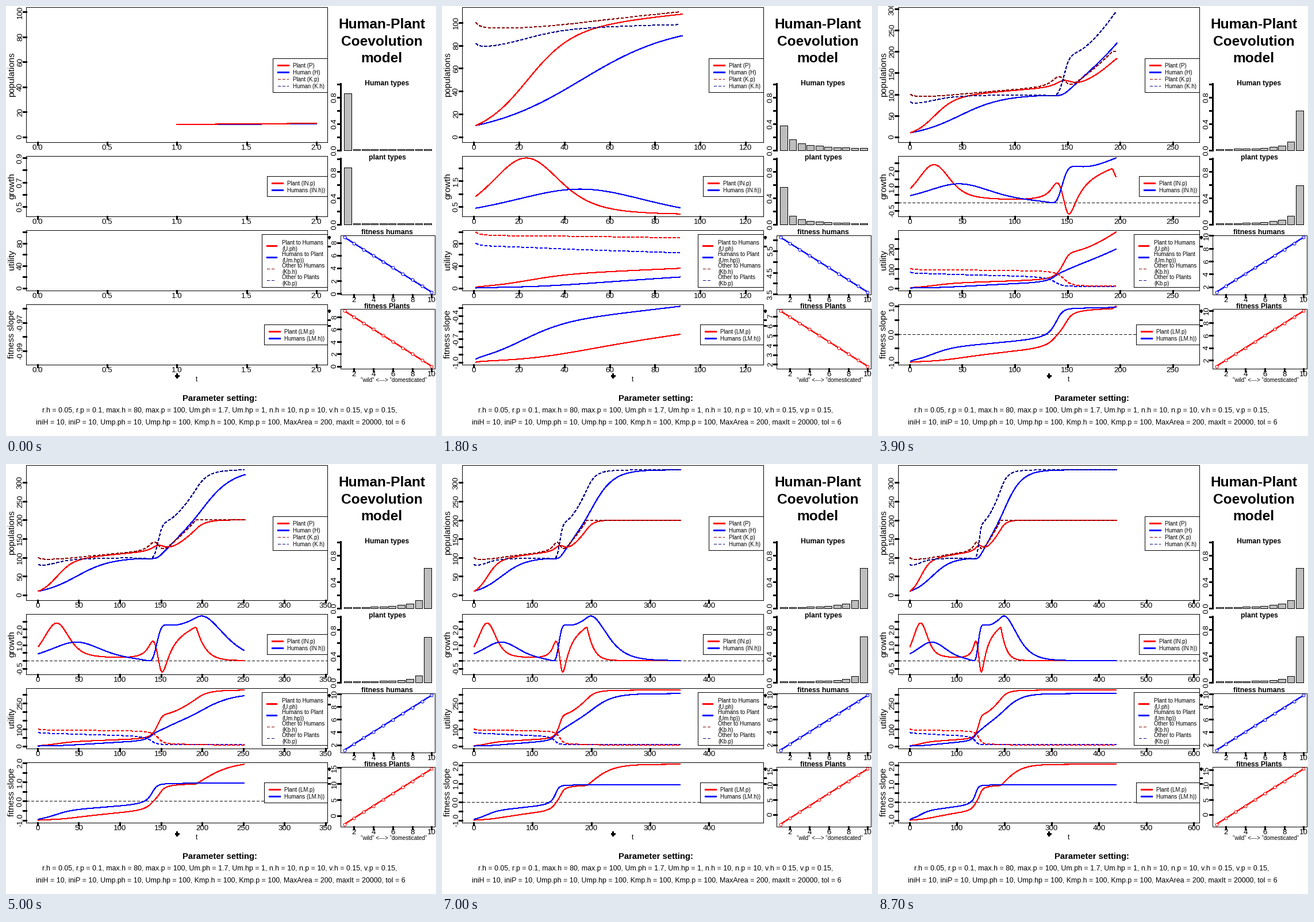
These frames come from a looping animation (748 by 748 pixels, 8800 ms). A matplotlib script:

```python
import math
import numpy as np
import matplotlib.pyplot as plt
from matplotlib.animation import FuncAnimation
from matplotlib.lines import Line2D
from matplotlib.patches import Rectangle

SIZE, DPI = 748, 100
FRAMES, STEP = 88, 5
PT = 72 / DPI
DASH = (0, (4.6, 3.2))
DARK_RED, DARK_BLUE = "#8b0000", "#00008b"
AXIS_FONT, GAP = 13.33, 8.45

plt.rcParams["font.family"] = "Liberation Sans"
fig = plt.figure(figsize=(SIZE / DPI, SIZE / DPI), dpi=DPI, facecolor="white")
ax = fig.add_axes([0, 0, 1, 1])
ax.set_xlim(0, SIZE)
ax.set_ylim(SIZE, 0)
ax.axis("off")


# ---- model -------------------------------------------------------------

def mutate(share, v=0.15):
    return (1 - v) * share + v / len(share)


def fitness(slope):
    return 5 + slope * (np.arange(1, 11) - 5)


def simulate(steps):
    keys = "P H Kp Kh INp INh Uph Uhp Kbh Kbp LMp LMh types_h types_p".split()
    log = {k: [] for k in keys}
    human = np.eye(10)[0]
    plant = np.eye(10)[0]
    H = P = 10.0
    for _ in range(steps):
        u_ph = P * (plant @ np.linspace(0.17, 1.7, 10))
        u_hp = H * (human @ np.linspace(0.01, 1, 10))
        kb_h = human @ np.linspace(80, 0.8, 10)
        kb_p = plant @ np.linspace(100, 1, 10)
        room = min(kb_p, 200 - u_hp)          # limited by the available area
        k_h, k_p = u_ph + kb_h, u_hp + room
        lm_h, lm_p = (u_ph - kb_h) / k_h, (u_hp - room) / k_p
        in_h = 0.05 * H * (1 - H / k_h)
        in_p = 0.1 * P * (1 - P / k_p)
        mixed_h, mixed_p = mutate(human), mutate(plant)
        row = (P, H, k_p, k_h, in_p, in_h, u_ph, u_hp, kb_h, kb_p,
               lm_p, lm_h, mixed_h, mixed_p)
        for k, value in zip(keys, row):
            log[k].append(value)
        human = mixed_h * np.maximum(fitness(lm_h), 0)
        plant = mixed_p * np.maximum(fitness(lm_p), 0)
        human, plant = human / human.sum(), plant / plant.sum()
        H, P = H + in_h, P + in_p
    return {k: np.array(v) for k, v in log.items()}


DATA = simulate(STEP * FRAMES + 5)


# ---- drawing helpers ---------------------------------------------------

def line(xs, ys, color="black", dash=None, z=2):
    art = Line2D(xs, ys, color=color, lw=0.75, ls=dash or "-",
                 antialiased=False, zorder=z)
    return ax.add_line(art)


def rect(x0, y0, x1, y1, fill="none", z=3):
    art = Rectangle((x0 + .5, y0 + .5), x1 - x0, y1 - y0, fc=fill, ec="black",
                    lw=0.72, antialiased=False, zorder=z)
    return ax.add_patch(art)


def text(x, y, s, px, ha="center", rot=0, bold=False):
    return ax.text(x, y, s, fontsize=px * PT, ha=ha, va="baseline",
                   rotation=rot, rotation_mode="anchor", zorder=6,
                   fontweight="bold" if bold else "normal")


def padded(lo, hi):
    pad = 0.04 * (hi - lo)
    return lo - pad, hi + pad


def pretty(lo, hi):
    """Round tick values inside lo..hi and their labels."""
    cell = (hi - lo) / 5
    base = unit = 10.0 ** math.floor(math.log10(cell))
    for mult, bias in ((2, .8), (5, 1.7), (10, .8)):
        if mult * base - cell >= bias * (cell - unit):
            break
        unit = mult * base
    digits = max(0, -math.floor(math.log10(unit) + 1e-9))
    first, last = math.ceil(lo / unit - 1e-9), math.floor(hi / unit + 1e-9)
    return [(i * unit, f"{i * unit:.{digits}f}") for i in range(first, last + 1)]


def label_width(s):
    return AXIS_FONT * sum({".": .278, "-": .333}.get(c, .556) for c in s)


class Panel:
    def __init__(self, x0, y0, x1, y1):
        self.box = x0, y0, x1, y1

    def set_range(self, xr, yr):
        self.xr, self.yr = xr, yr

    def px(self, v):
        x0, _, x1, _ = self.box
        lo, hi = self.xr
        return x0 + .5 + (np.asarray(v) - lo) / (hi - lo) * (x1 - x0)

    def py(self, v):
        _, y0, _, y1 = self.box
        lo, hi = self.yr
        return y1 + .5 - (np.asarray(v) - lo) / (hi - lo) * (y1 - y0)

    def x_axis(self):
        bottom = self.box[3] + .5
        arts, end = [], -1e9
        for v, s in pretty(*self.xr):
            x, w = float(self.px(v)), label_width(s)
            arts.append(line([x, x], [bottom, bottom + 4]))
            if x - w / 2 >= end + GAP:
                arts.append(text(x, bottom + 13.5, s, AXIS_FONT))
                end = x + w / 2
        return arts

    def y_axis(self):
        left = self.box[0] + .5
        arts, end = [], -1e9
        for v, s in pretty(*self.yr):
            y, w = float(self.py(v)), label_width(s)
            arts.append(line([left - 5, left], [y, y]))
            if -y - w / 2 >= end + GAP:
                arts.append(text(left - 7.5, y, s, AXIS_FONT, rot=90))
                end = -y + w / 2
        return arts

    def curve(self, ys, color, dash=None):
        return line(self.px(np.arange(1, len(ys) + 1)), self.py(ys), color, dash)

    def zero_line(self):
        if not self.yr[0] < 0 < self.yr[1]:
            return []
        y = float(self.py(0))
        return [line([self.box[0] + 1, self.box[2]], [y, y], "black", DASH, z=1.5)]


pops = Panel(35, 1, 559, 236)
growth = Panel(35, 260, 559, 365)
utility = Panel(35, 389, 559, 494)
slope = Panel(35, 518, 559, 623)
fit_h = Panel(582, 398, 746, 501)
fit_p = Panel(582, 526, 746, 630)
bars_h = Panel(582, 135, 746, 250)
bars_p = Panel(582, 265, 746, 379)


# ---- fixed parts -------------------------------------------------------

def legend(box, pitch, entries):
    x0, y0 = box[:2]
    rect(*box, fill="white", z=4)
    for i, (label, color, dash) in enumerate(entries):
        rows = label.split("\n")
        y = round(y0 + pitch[0] + i * pitch[1]) + .5
        line([x0 + 9, x0 + 27 if len(rows) == 1 else x0 + 25], [y, y],
             color, dash, z=5)
        top = y + 4 if len(rows) == 1 else y - 1.5
        for j, row in enumerate(rows):
            text(x0 + 35.5, top + 11 * j, row, 9.8, ha="left")


def draw_fixed():
    for panel, label in ((pops, "populations"), (growth, "growth"),
                         (utility, "utility"), (slope, "fitness slope")):
        _, y0, _, y1 = panel.box
        rect(*panel.box)
        text(14, (y0 + y1) / 2 + .5, label, 15.3, rot=90)

    legend((464, 90, 559, 149), (12, 11.9), [
        ("Plant (P)", "red", None), ("Human (H)", "blue", None),
        ("Plant (K.p)", DARK_RED, DASH), ("Human (K.h)", DARK_BLUE, DASH)])
    legend((454, 295, 559, 330), (12, 12), [
        ("Plant (IN.p)", "red", None), ("Humans (IN.h))", "blue", None)])
    legend((445, 396, 559, 488), (20, 20), [
        ("Plant to Humans\n(U.ph)", "red", None),
        ("Humans to Plant\n(Um.hp))", "blue", None),
        ("Other to Humans\n(Kb.h)", DARK_RED, DASH),
        ("Other to Plants\n(Kb.p)", DARK_BLUE, DASH)])
    legend((449, 553, 559, 588), (12, 12), [
        ("Plant (LM.p)", "red", None), ("Humans (LM.h))", "blue", None)])

    for i, word in enumerate(("Human-Plant", "Coevolution", "model")):
        text(653.7, 39 + 29.7 * i, word, 24.5, bold=True)
    for y, title in ((137.5, "Human types"), (267, "plant types"),
                     (397, "fitness humans"), (526, "fitness Plants")):
        text(663, y, title, 12.3, bold=True)

    for panel in (bars_h, bars_p):
        panel.set_range((-.272, 12.472), (0, 1))
        x0, y0, _, y1 = panel.box
        line([x0 + .5] * 2, [y0, y1 + 1])
        panel.y_axis()
    for panel in (fit_h, fit_p):
        rect(*panel.box)
        panel.set_range(padded(1, 10), (0, 1))
        panel.x_axis()

    text(675, 653.5, '"wild" <---> "domesticated"', 9.8)
    text(332, 653, "t", 12)
    line([297.5, 297.5], [640, 646])
    line([295, 300], [642.5, 642.5])
    line([296, 299], [643.5, 643.5])
    # stubs of the hidden axis titles
    for y in (401, 417, 529, 545, 555):
        line([560.5, 563], [y + .5, y + .5])
    for y in (401, 529):
        line([562.5, 562.5], [y, y + 3])

    text(372.5, 686.5, "Parameter setting:", 14.9, bold=True)
    text(371.5, 707.5, "r.h = 0.05, r.p = 0.1, max.h = 80, max.p = 100, "
         "Um.ph = 1.7, Um.hp = 1, n.h = 10, n.p = 10, v.h = 0.15, v.p = 0.15,",
         12.45)
    text(373, 728, "iniH = 10, iniP = 10, Ump.ph = 10, Ump.hp = 100, "
         "Kmp.h = 100, Kmp.p = 100, MaxArea = 200, maxIt = 20000, tol = 6",
         12.4)


# ---- moving parts ------------------------------------------------------

def draw_panel(panel, xr, low, curves, zero=False):
    values = np.concatenate([c[0] for c in curves])
    low = values.min() if low is None else low
    panel.set_range(xr, padded(low, values.max()))
    arts = panel.x_axis() + panel.y_axis()
    if zero:
        arts += panel.zero_line()
    return arts + [panel.curve(*c) for c in curves]


def draw_bars(panel, shares):
    arts = []
    base = panel.box[3]
    for i, share in enumerate(shares):
        left = float(panel.px(.2 + 1.2 * i)) - .5
        right = float(panel.px(1.2 + 1.2 * i)) - .5
        top = float(panel.py(share)) - .5
        arts.append(rect(round(left), round(top), round(right), base, "#bebebe"))
    return arts


def draw_fitness(panel, lm, color):
    ys = fitness(lm)
    panel.set_range(padded(1, 10), padded(ys.min(), ys.max()))
    xs, ys = panel.px(np.arange(1, 11)), panel.py(ys)
    dots = Line2D(xs, ys, ls="none", marker="o", ms=5 * PT, mfc="white",
                  mec=color, mew=0.75, zorder=3.5)
    return panel.y_axis() + [line(xs, ys, color), ax.add_line(dots)]


moving = []


def update(frame):
    while moving:
        moving.pop().remove()
    n = STEP * frame + 1
    d = {k: v[:n] for k, v in DATA.items()}
    xr = padded(0, math.ceil(1.35 * n))
    moving.extend(draw_panel(pops, xr, 0, [
        (DATA["H"][:n + 1], "blue"), (DATA["P"][:n + 1], "red"),
        (d["Kp"], DARK_RED, DASH), (d["Kh"], DARK_BLUE, DASH)]))
    moving.extend(draw_panel(growth, xr, None, [
        (d["INp"], "red"), (d["INh"], "blue")], zero=True))
    moving.extend(draw_panel(utility, xr, 0, [
        (d["Uph"], "red"), (d["Uhp"], "blue"),
        (d["Kbh"], "blue", DASH), (d["Kbp"], "red", DASH)]))
    moving.extend(draw_panel(slope, xr, None, [
        (d["LMp"], "red"), (d["LMh"], "blue")], zero=True))
    moving.extend(draw_bars(bars_h, d["types_h"][-1]))
    moving.extend(draw_bars(bars_p, d["types_p"][-1]))
    moving.extend(draw_fitness(fit_h, d["LMh"][-1], "blue"))
    moving.extend(draw_fitness(fit_p, d["LMp"][-1], "red"))
    return moving


draw_fixed()
anim = FuncAnimation(fig, update, frames=FRAMES, interval=100,
                     init_func=lambda: update(0), repeat=True, repeat_delay=0)
plt.show()
```
